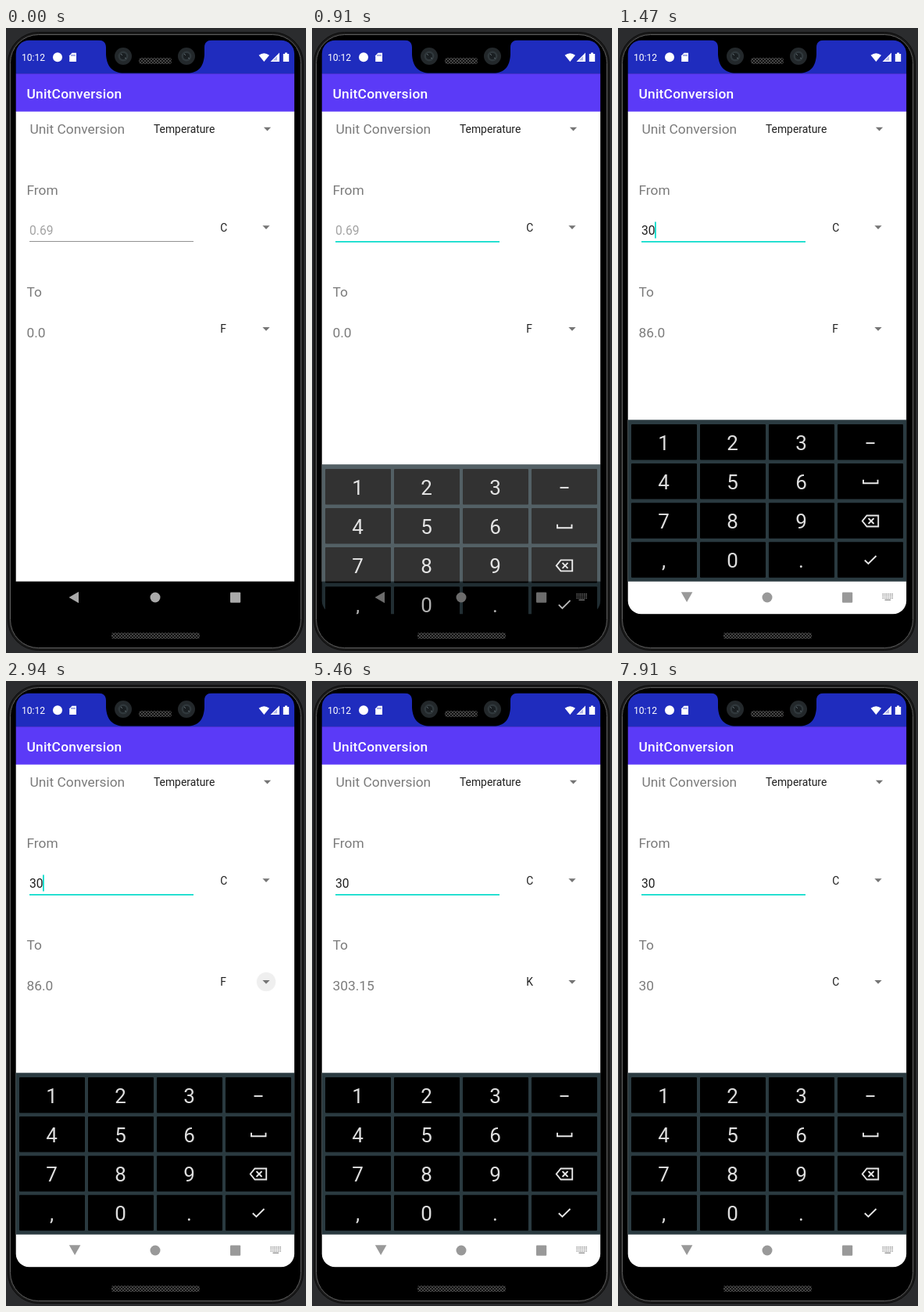
An HTML page that plays this animation: 384x798 px, repeating every 8000 ms.

```html
<!DOCTYPE html>
<html lang="en">
<head>
<meta charset="utf-8">
<title>Unit conversion</title>
<style>
  html, body { margin: 0; width: 100%; height: 100%; overflow: hidden; background: #2b2c2e; }
  body { position: relative; font-family: Roboto, sans-serif; }
  svg { position: absolute; left: 0; top: 0; width: 384px; height: 798px; }
  text { white-space: pre; }
  .title { font-size: 17.33px; font-weight: 500; letter-spacing: .0125em; fill: #fff; }
  .label { font-size: 17.33px; fill: #7b7b7b; }
  .item { font-size: 13.87px; fill: #202020; }
  .field { font-size: 15.6px; fill: #202020; }
  .hint { fill: #a3a3a3; }
  .digit { font-size: 26px; fill: #dedede; text-anchor: middle; }
  .line { fill: none; stroke: #e6e6e6; stroke-width: 1.9; }

  #keyboard { animation: slide 8s linear infinite; }
  @keyframes slide {
    0%, 10.49% { opacity: 0; transform: translateY(73px); }
    10.5% { opacity: .4; transform: translateY(70px); }
    11.375% { opacity: .8; transform: translateY(57.5px); animation-timing-function: ease-out; }
    12.25% { opacity: 1; transform: translateY(32px); animation-timing-function: ease-out; }
    15.75%, 100% { opacity: 1; transform: none; }
  }
  #nav { animation: nav 8s linear infinite; }
  @keyframes nav {
    0%, 10.5% { fill: #aaa; }
    11.375% { fill: #6c6c6c; }
    15.75%, 100% { fill: #999; }
  }
  #ripple { transform-origin: 333px 384px; animation: ripple 8s linear infinite; }
  @keyframes ripple {
    0%, 35.8% { opacity: 0; transform: scale(.4); }
    37.625%, 41.125% { opacity: .12; transform: none; }
    46.375% { opacity: 0; transform: none; }
    46.4%, 69.9% { opacity: 0; transform: scale(.4); }
    71.75%, 72.625% { opacity: .12; transform: none; }
    77.8%, 100% { opacity: 0; transform: none; }
  }
  #menu {
    position: absolute; left: 267px; top: 363.5px; width: 45px; height: 124px;
    background: #fff; border-radius: 2px;
    box-shadow: 2px 3px 6px rgba(0, 0, 0, .2);
    animation: menu 8s linear infinite;
  }
  #menu div {
    position: relative; height: 41.4px; line-height: 41.4px; padding-left: 7.4px;
    font-size: 13.87px; color: #202020;
  }
  #menu i { position: absolute; inset: 0; background: #000; opacity: 0; }
  @keyframes menu {
    0%, 41% { opacity: 0; clip-path: inset(0 0 83px 0); }
    46.3%, 61.25% { opacity: 1; clip-path: inset(-12px); }
    65.6% { opacity: 0; clip-path: inset(-12px); }
    65.7%, 72.5% { opacity: 0; clip-path: inset(0 0 83px 0); }
    77.8%, 87.5% { opacity: 1; clip-path: inset(-12px); }
    91.8%, 100% { opacity: 0; clip-path: inset(-12px); }
  }
  #pickK { animation: pickK 8s linear infinite; }
  @keyframes pickK { 0%, 57.7% { opacity: 0; } 59.5%, 65.6% { opacity: .12; } 65.7%, 100% { opacity: 0; } }
  #pickC { animation: pickC 8s linear infinite; }
  @keyframes pickC { 0%, 85.7% { opacity: 0; } 87%, 91.8% { opacity: .12; } 91.9%, 100% { opacity: 0; } }
</style>
</head>
<body>
<svg viewBox="0 0 384 798">
  <defs>
    <clipPath id="screen"><rect x="12.700" y="15.700" width="356.400" height="732.600" rx="17"/></clipPath>
    <pattern id="mesh" width="4" height="4" patternUnits="userSpaceOnUse">
      <rect width="4" height="4" fill="#111"/>
      <path d="M0 0L4 4M4 0L0 4" stroke="#4b4b4b" stroke-width=".9"/>
    </pattern>
    <path id="arrow" d="M-4.6 -2.2H4.6L0 2.4Z" fill="#757575"/>
    <g id="lens">
      <circle r="11" fill="#23282b"/>
      <circle r="6.5" fill="#30383c"/>
      <circle r="4" fill="#1a1f22"/>
      <path d="M-3 -3L-1 -1M2 2L4 3" stroke="#5d686d"/>
    </g>
  </defs>

  <!-- phone body -->
  <rect width="384" height="798" fill="#2b2c2e"/>
  <rect x="2.500" y="5.500" width="378" height="789" rx="39" fill="#1b1b1b" stroke="#0b0b0b"/>
  <rect x="5.500" y="8.500" width="372" height="783" rx="36" fill="#000" stroke="#606060"/>
  <rect x="135" y="772" width="113" height="8" rx="2" fill="url(#mesh)"/>

  <g clip-path="url(#screen)">
    <rect x="12" y="15" width="358" height="43.200" fill="#1f2cbe"/>
    <rect x="12" y="58.200" width="358" height="49" fill="#5b3af7"/>
    <rect x="12" y="106.700" width="358" height="600.100" fill="#fff"/>
    <rect x="12" y="706.800" width="358" height="42" fill="#000"/>

    <!-- status bar -->
    <g fill="#fff">
      <text x="20" y="42" font-size="12.1">10:12</text>
      <circle cx="66" cy="37.3" r="6"/>
      <path d="M84.500 31.800H90V43H81.200V35.200Z"/>
      <path d="M323.600 34.800Q330.300 29.600 337 34.800L330.300 43Z"/>
      <path d="M350 31.500V43H338.500Z"/>
      <path d="M354.800 33H357V31.600H360V33H362.200V43H354.800Z"/>
    </g>
    <path d="M84 33.800V36M86 33.800V36M88 33.800V36" stroke="#1f2cbe" stroke-width=".8"/>
    <path d="M347 36V41.500H341.600Z" fill="#1f2cbe" opacity=".35"/>

    <text class="title" x="26.600" y="89.500">UnitConversion</text>

    <!-- form -->
    <text class="label" x="30.500" y="135">Unit Conversion</text>
    <text class="item" x="189" y="134">Temperature</text>
    <use href="#arrow" x="334.500" y="129"/>
    <text class="label" x="26.500" y="213">From</text>
    <text class="item" x="274.300" y="259.500">C</text>
    <use href="#arrow" x="333" y="254.500"/>
    <text class="label" x="26.500" y="343">To</text>
    <circle id="ripple" cx="333" cy="384" r="17"/>
    <use href="#arrow" x="333" y="384.300"/>

    <rect data-on="0-280" x="30" y="272" width="210" height=".9" fill="#868686"/>
    <rect data-on="280-8000" x="30" y="272" width="210" height="1.750" fill="#0bdccb"/>

    <text data-on="0-1190" class="field hint" x="30" y="264">0.69</text>
    <text data-on="1190-1400" class="field" x="30" y="264">3</text>
    <text data-on="1400-8000" class="field" x="30" y="264">30</text>

    <g fill="#0bdccb">
      <rect data-on="280-840" x="29.500" y="247.500" width="1.800" height="21"/>
      <rect data-on="1190-1400" x="38.300" y="247.500" width="1.800" height="21"/>
      <rect data-on="1400-1960 2450-3290 4900-5390 7000-7490" x="47" y="247.500" width="1.800" height="21"/>
    </g>

    <g class="label">
      <text data-on="0-1190" x="26.500" y="395">0.0</text>
      <text data-on="1190-1400" x="26.500" y="395">37.4</text>
      <text data-on="1400-4970" x="26.500" y="395">86.0</text>
      <text data-on="4970-7070" x="26.500" y="395">303.15</text>
      <text data-on="7070-8000" x="26.500" y="395">30</text>
    </g>
    <text data-on="0-4970" class="item" x="274.300" y="389.300">F</text>
    <text data-on="4970-7070" class="item" x="274.300" y="389.300">K</text>
    <text data-on="7070-8000" class="item" x="274.300" y="389.300">C</text>

    <g id="keyboard">
      <rect x="12" y="500.300" width="358" height="206.500" fill="#2a3a40"/>
      <rect x="12" y="706.800" width="358" height="42" fill="#fff"/>
      <g id="keys"></g>
      <path class="line" d="M317.500 530H328.500"/>
      <path class="line" d="M314 576.800V581.300H332.500V576.800"/>
      <path class="line" d="M318.500 622.500H333.200V636.500H318.500L312.800 629.500ZM320.500 626L327.500 633M327.500 626L320.500 633"/>
      <path class="line" d="M315.800 679.500L320.400 684L330.500 674"/>
    </g>

    <!-- navigation -->
    <g id="nav">
      <path data-on="0-1120" d="M80.500 727L93 719.800V734.200Z"/>
      <path data-on="1120-8000" d="M80.800 720.300H95.400L88.100 733Z"/>
      <circle cx="191" cy="727" r="6.500"/>
      <rect x="287" y="720.500" width="13.200" height="13.200" rx="1"/>
      <g id="dots" data-on="420-8000"><rect x="341.500" y="729.500" width="7.500" height="1.500"/></g>
    </g>
  </g>

  <!-- notch -->
  <path d="M117 15C125 15.500 128 19 128 25V34C129 50 137 57.500 151 57.500H232C246 57.500 253 50 254 34V25C254 19 257 15.500 265 15Z"/>
  <use href="#lens" x="150" y="36"/>
  <use href="#lens" x="231" y="36"/>
  <rect x="170" y="38" width="42" height="8" rx="3" fill="url(#mesh)"/>
</svg>

<div id="menu">
  <div>C<i id="pickC"></i></div>
  <div>F</div>
  <div>K<i id="pickK"></i></div>
</div>

<script>
  const LOOP = 8000;

  function add(parent, tag, attrs, text = "") {
    const el = document.createElementNS("http://www.w3.org/2000/svg", tag);
    for (const key in attrs) el.setAttribute(key, attrs[key]);
    el.textContent = text;
    parent.append(el);
  }

  // keypad: the last column holds drawn symbols
  const keys = document.getElementById("keys");
  ["123 ", "456 ", "789 ", ",0. "].forEach((row, r) => {
    [...row].forEach((char, c) => {
      const x = 17 + c * 88, y = 506 + r * 50.1;
      add(keys, "rect", { x, y, width: 84, height: 45.5, rx: 1 });
      if (char !== " ") add(keys, "text", { class: "digit", x: x + 41.5, y: 539 + r * 50 }, char);
    });
  });

  const dots = document.getElementById("dots");
  for (let r = 0; r < 3; r++)
    for (let c = 0; c < 6; c++)
      add(dots, "rect", { x: 338.5 + c * 2.4, y: 722 + r * 2.5, width: 1.5, height: 1.5 });

  // data-on lists the visible spans in ms
  let css = "";
  document.querySelectorAll("[data-on]").forEach((el, i) => {
    let steps = "0%{visibility:hidden}";
    for (const span of el.dataset.on.split(" ")) {
      const [from, to] = span.split("-").map(ms => ms / LOOP * 100);
      steps += `${from}%{visibility:visible}`;
      steps += `${to}%{visibility:${to < 100 ? "hidden" : "visible"}}`;
    }
    css += `@keyframes on${i}{${steps}}`;
    el.style.animation = `on${i} ${LOOP}ms step-end infinite`;
  });
  document.head.append(Object.assign(document.createElement("style"), { textContent: css }));
</script>
</body>
</html>
```
